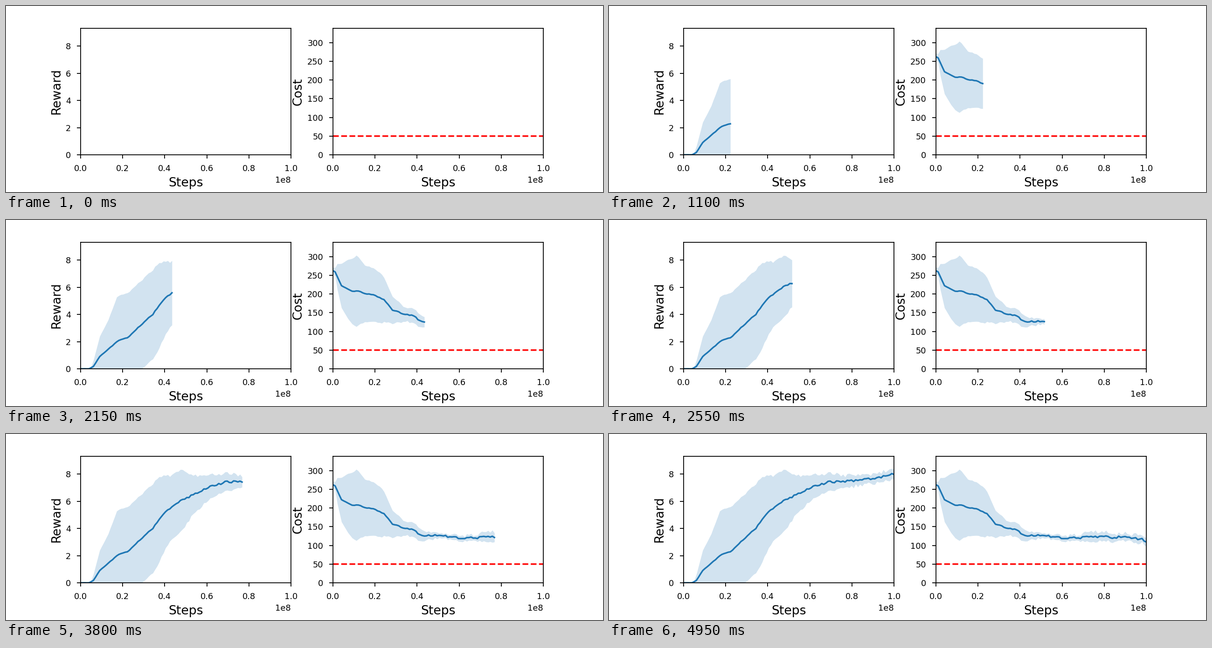
Animation, 1280 px wide and 400 px high, one loop 5000 ms. Source, as a matplotlib script:

```python
import matplotlib.pyplot as plt
import numpy as np
from matplotlib.animation import FuncAnimation

STEPS = 100
BLUE = "#1f77b4"

plt.rcParams.update({
    "font.family": "DejaVu Sans",
    "path.snap": False,
    "xtick.labelsize": 8, "ytick.labelsize": 8,
    "xtick.major.pad": 6, "ytick.major.pad": 6,
    "axes.labelsize": 12,
})

rng = np.random.default_rng(4)
progress = np.linspace(0, 1, STEPS)
x = progress * 1e8


def noisy_curve(jitter, *keys):
    """Line through (step, value) keys with jitter that grows over the run."""
    trend = np.interp(np.arange(STEPS), *zip(*keys))
    return trend + jitter * progress * rng.uniform(-1, 1, STEPS)


reward_mean = noisy_curve(
    .12, (0, 0), (4, 0), (6, .17), (9, .9), (18, 2.1), (22, 2.27), (30, 3.45),
    (34, 4), (39, 5.08), (45, 5.85), (52, 6.4), (61, 7.05), (68, 7.4),
    (82, 7.55), (99, 7.95))
reward_std = noisy_curve(
    .12, (0, 0), (5, .1), (9, 1.5), (13, 2.15), (17, 3.3), (36, 3.25),
    (42, 2.4), (48, 2.2), (52, 1.5), (60, .9), (71, .55), (80, .4), (99, .35))
cost_mean = noisy_curve(
    4.5, (0, 262), (1, 259), (4, 222), (9, 207), (12, 208), (15, 201),
    (19, 198), (24, 184), (28, 157), (33, 147), (38, 142), (41, 127),
    (51, 126), (62, 119), (79, 123), (88, 121), (99, 113))
cost_std = noisy_curve(
    4, (0, 9), (1, 11), (2, 34), (4, 59), (7, 79), (11, 95), (15, 76),
    (20, 70), (23, 65), (28, 36), (34, 18), (39, 20), (44, 12), (52, 6),
    (68, 8), (72, 15), (84, 11), (99, 10))

fig, (reward_ax, cost_ax) = plt.subplots(1, 2, figsize=(8, 2.5), dpi=160)
fig.subplots_adjust(left=.125, right=.9, bottom=.2, top=.88, wspace=.2)


def make_panel(ax, label, top, ticks, mean, std):
    ax.set(xlim=(0, 1e8), ylim=(0, top), yticks=ticks, xlabel="Steps")
    ax.set_ylabel(label, labelpad=3)
    line, = ax.plot([], [], color=BLUE, lw=1.5)
    band = ax.fill_between(x[:1], mean[:1], color=BLUE, alpha=.2, lw=0)
    return line, band, mean, std


panels = [
    make_panel(reward_ax, "Reward", 9.3, range(0, 9, 2),
               reward_mean, reward_std),
    make_panel(cost_ax, "Cost", 338, range(0, 301, 50), cost_mean, cost_std),
]
cost_ax.axhline(50, color="red", ls="--", lw=1.5)


def update(step):
    shown = slice(0, step + 1)
    for line, band, mean, std in panels:
        line.set_data(x[shown], mean[shown])
        upper = np.column_stack([x, mean + std])[shown]
        lower = np.column_stack([x, mean - std])[shown]
        band.set_verts([np.vstack([upper, lower[::-1]])])
    return [artist for panel in panels for artist in panel[:2]]


anim = FuncAnimation(fig, update, frames=STEPS, interval=50,
                     repeat=True, repeat_delay=0)
plt.show()
```
